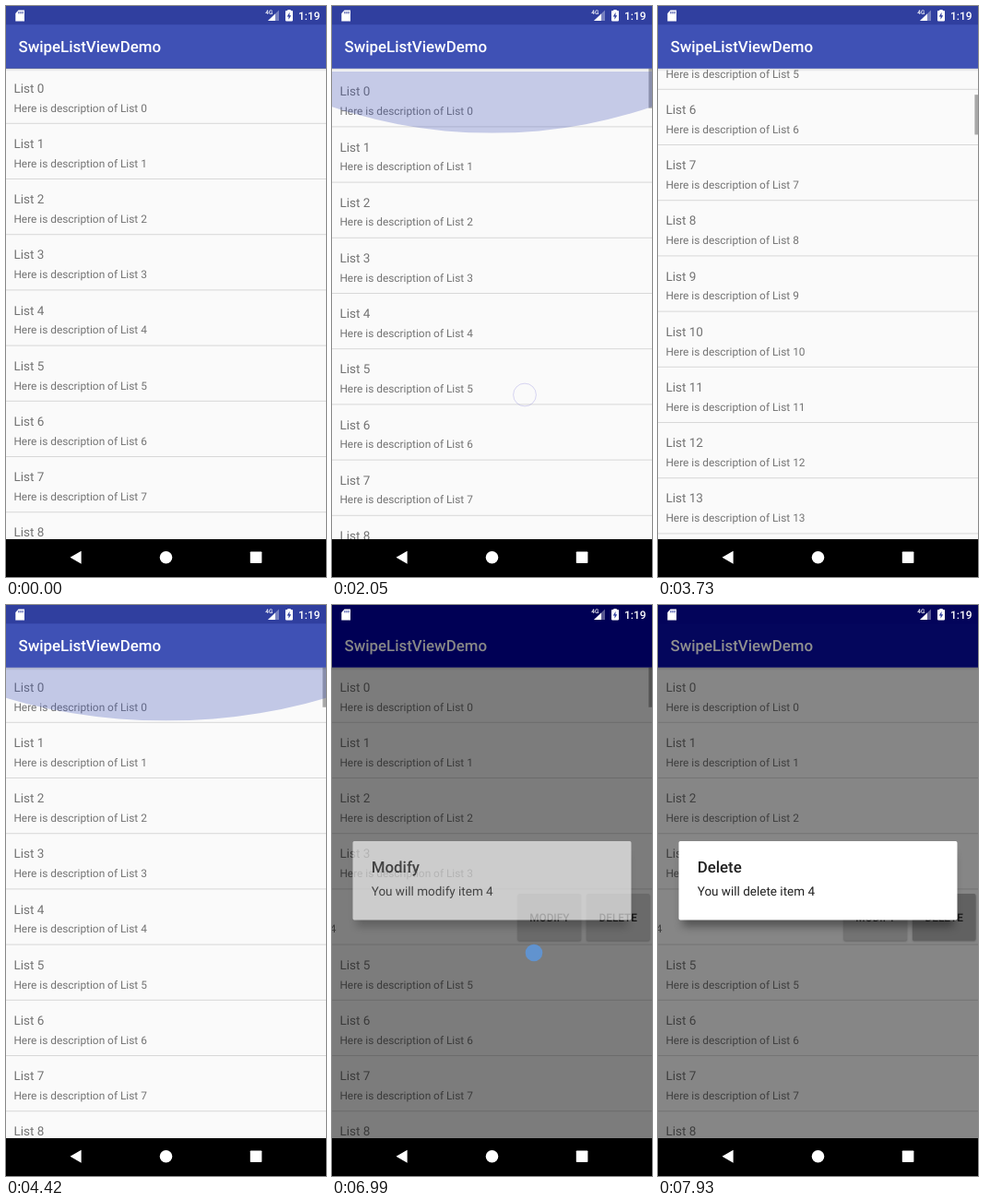
Recreate the animation shown at these times as an HTML page with a canvas. Size 347 px wide and 619 px high, loop 8 s.

```html
<!DOCTYPE html>
<html lang="en">
<head>
<meta charset="utf-8">
<title>Swipe list</title>
<style>
  html, body { margin: 0; width: 100%; height: 100%; overflow: hidden; background: #000; }
  canvas { display: block; width: 347px; height: 619px; }
</style>
</head>
<body>
<canvas id="stage"></canvas>
<script>
const W = 347, H = 619, LOOP = 8000;
const LIST_TOP = 67.5, LIST_END = 578, LIST_H = LIST_END - LIST_TOP;
const ROW = 60.2, ROWS = 100, PAD = 8.4;
const MENU = 148.5, SWIPED = 4;
const DIM = 0.5;

const dpr = window.devicePixelRatio || 1;

function setup(canvas) {
  canvas.width = Math.round(W * dpr);
  canvas.height = Math.round(H * dpr);
  const c = canvas.getContext('2d');
  c.scale(dpr, dpr);
  c.textRendering = 'geometricPrecision';
  return c;
}

const stage = setup(document.getElementById('stage'));
const layer = setup(document.createElement('canvas'));
let ctx = stage;

const prog = (t, a, b) => Math.min(1, Math.max(0, (t - a) / (b - a)));
const smooth = u => u * u * (3 - 2 * u);
const easeOut = u => 1 - (1 - u) * (1 - u);
const mix = (a, b, u) => a + (b - a) * u;
const mixRgb = (a, b, u) => `rgb(${a.map((v, i) => Math.round(mix(v, b[i], u)))})`;
const move = (t, a, b, from, to) => mix(from, to, smooth(prog(t, a, b)));

// down, end of easing, release, x0, y0, x1, y1
const touches = [
  [550, 1050, 930, 214, 335, 206, 20],
  [1360, 2010, 2010, 203, 118, 209, 421.5],
  [3310, 3720, 3630, 212, 425, 206, 75],
  [3790, 4200, 4200, 205, 110, 210, 440],
  [5280, 5700, 5620, 268, 341, 120, 338],
  [6010, 6090, 6090, 236, 338, 236, 338],
  [6990, 7060, 7060, 219, 377, 219, 377],
  [7570, 7650, 7650, 310, 340, 310, 340]
];

const buttons = [
  { label: 'MODIFY', dx: 3, pressed: 6010, x: 236, y: 338 },
  { label: 'DELETE', dx: 77.5, pressed: 7570, x: 310, y: 340 }
];

function scrollAt(t) {
  if (t < 1360) return move(t, 550, 1050, 0, 293.6);
  if (t < 2050) return move(t, 1360, 2040, 293.6, -3.6);
  if (t < 3310) return move(t, 2050, 2140, -3.6, 0);
  if (t < 3780) return move(t, 3310, 3720, 0, 338);
  if (t < 4230) return move(t, 3780, 4230, 338, -3.6);
  return move(t, 4230, 4320, -3.6, 0);
}

function scrollbarAlpha(t) {
  if (t < 550) return 0;
  if (t < 3310) return 1 - prog(t, 2400, 2650);
  if (t < 5280) return 1 - prog(t, 4600, 4850);
  return 1 - prog(t, 7000, 7250);
}

function dialogAt(t) {
  if (t < 6990) {
    const u = easeOut(prog(t, 6230, 6460));
    return { name: 'Modify', alpha: u, scale: mix(0.92, 1, u), dim: DIM * u };
  }
  if (t < 7500) {
    return { name: 'Modify', alpha: 0.62 * (1 - prog(t, 6990, 7090)), scale: 1,
             dim: DIM * (1 - prog(t, 7000, 7250)) };
  }
  const u = easeOut(prog(t, 7740, 7920));
  return { name: 'Delete', alpha: u, scale: mix(0.92, 1, u), dim: 0.465 * u };
}

function text(str, x, y, size, color, weight = 400, align = 'left') {
  ctx.font = `${weight} ${size}px Roboto, sans-serif`;
  ctx.textAlign = align;
  ctx.fillStyle = color;
  ctx.fillText(str, x, y);
}

function rect(x, y, w, h, color) {
  ctx.fillStyle = color;
  ctx.fillRect(x, y, w, h);
}

function poly(points, color) {
  ctx.beginPath();
  points.forEach(([x, y]) => ctx.lineTo(x, y));
  ctx.closePath();
  ctx.fillStyle = color;
  ctx.fill();
}

function disc(x, y, r, color) {
  ctx.beginPath();
  ctx.arc(x, y, r, 0, Math.PI * 2);
  ctx.fillStyle = color;
  ctx.fill();
}

function roundRect(x, y, w, h, r, color) {
  ctx.beginPath();
  ctx.roundRect(x, y, w, h, r);
  ctx.fillStyle = color;
  ctx.fill();
}

function shadow(color, blur, dy) {
  ctx.shadowColor = color;
  ctx.shadowBlur = blur * dpr;
  ctx.shadowOffsetY = dy * dpr;
}

function drawButton(b, left, top, t) {
  const x = left + b.dx, y = top + 4.8, w = 68.5, h = 50.7;
  ctx.save();
  shadow('rgba(0,0,0,.3)', 2, 0.8);
  roundRect(x, y, w, h, 1.7, '#d6d6d6');
  ctx.restore();
  const fade = 1 - prog(t, b.pressed + 300, b.pressed + 700);
  if (t >= b.pressed && fade > 0) {
    ctx.save();
    ctx.clip();
    const r = mix(8, 60, easeOut(prog(t, b.pressed, b.pressed + 400)));
    disc(b.x, b.y, r, `rgba(0,0,0,${0.18 * fade})`);
    ctx.restore();
  }
  text(b.label, x + w / 2, top + 34.2, 11.8, '#212121', 500, 'center');
}

function drawRows(t) {
  const scroll = scrollAt(t);
  const swipe = move(t, 5280, 5740, 0, MENU);
  const first = Math.max(0, Math.floor(scroll / ROW));
  for (let i = first; i < first + 10; i++) {
    const top = LIST_TOP + i * ROW - scroll;
    const shift = i === SWIPED ? swipe : 0;
    text(`List ${i}`, PAD - shift, top + 26.3, 13.5, '#737373');
    text(`Here is description of List ${i}`, PAD - shift, top + 47, 11.87, '#737373');
    if (shift > 0) buttons.forEach(b => drawButton(b, W - shift, top, t));
    rect(0, top + 59.3, W, 1, '#d8d8d8');
  }
  const thumbY = LIST_TOP + Math.max(0, scroll) * LIST_H / (ROW * ROWS);
  rect(343.4, thumbY, 3.6, LIST_H * LIST_H / (ROW * ROWS), `rgba(0,0,0,${0.33 * scrollbarAlpha(t)})`);
}

// Edge glow: a wide circle peeking in from the top of the pulled list
function drawGlow(t, start, fade, end) {
  if (t < start || t > end) return;
  const rise = prog(t, start, start + 115);
  const left = (1 - prog(t, fade, end)) ** 2;
  const r = W * 1.5, depth = r * (1 - Math.cos(Math.PI / 6));
  ctx.save();
  ctx.translate(W / 2, LIST_TOP + Math.max(0, -scrollAt(t)));
  ctx.scale(1, Math.max(0.001, easeOut(rise) * left));
  ctx.beginPath();
  ctx.rect(-W / 2, 0, W, depth);
  ctx.clip();
  disc(0, depth - r, r, `rgba(63,81,181,${0.36 * rise * left})`);
  ctx.restore();
}

function drawList(t, dim) {
  ctx.save();
  ctx.beginPath();
  ctx.rect(0, LIST_TOP, W, LIST_H);
  ctx.clip();
  rect(0, LIST_TOP, W, LIST_H, '#fafafa');
  drawRows(t);
  drawGlow(t, 1960, 2190, 2910);
  drawGlow(t, 4150, 4360, 5060);
  const g = ctx.createLinearGradient(0, LIST_TOP, 0, LIST_TOP + 3.4);
  g.addColorStop(0, 'rgba(0,0,0,.15)');
  g.addColorStop(1, 'rgba(0,0,0,0)');
  rect(0, LIST_TOP, W, 3.4, g);
  if (dim > 0) rect(0, LIST_TOP, W, LIST_H, `rgba(0,0,0,${dim})`);
  ctx.restore();
}

function drawBars(dim) {
  const u = dim / DIM;
  rect(0, 0, W, LIST_TOP, mixRgb([63, 81, 181], [0, 0, 85], u));
  rect(0, 0, W, 20.2, mixRgb([48, 63, 159], [0, 0, 85], u));
  text('SwipeListViewDemo', 13.5, 50.4, 16.87, mixRgb([255, 255, 255], [135, 135, 135], u), 500);

  // Status icons
  poly([[13.5, 4.5], [20, 4.5], [20, 16.5], [10.3, 16.5], [10.3, 8]], '#fff');
  [13.4, 15.5, 17.6].forEach(x => rect(x, 6, 1, 2.4, '#303f9f'));
  text('4G', 281.3, 9.2, 6.4, '#fff', 500);
  poly([[284, 16], [296, 16], [296, 4.5]], 'rgba(255,255,255,.35)');
  poly([[284, 16], [292, 16], [292, 8.4]], '#fff');
  rect(305.3, 4, 3.4, 2, '#fff');
  roundRect(303, 5, 8, 11.4, 0.8, '#fff');
  poly([[307.6, 6.8], [304.8, 11.4], [306.6, 11.4], [306.4, 14.8], [309.2, 10.2], [307.4, 10.2]], '#303f9f');
  text('1:19', 317, 14.9, 12, '#fff', 500);

  // Navigation
  rect(0, LIST_END, W, H - LIST_END, '#000');
  poly([[69.5, 597.8], [81.6, 590.8], [81.6, 604.8]], '#fff');
  disc(173.5, 597.8, 6.8, '#fff');
  roundRect(264.8, 591.5, 12.6, 12.6, 0.8, '#fff');
}

function drawDialogBox(name, scale) {
  const x = 22.5, y = 256, w = 302, h = 85.5;
  ctx.clearRect(0, 0, W, H);
  ctx.save();
  ctx.translate(x + w / 2, y + h / 2);
  ctx.scale(scale, scale);
  ctx.translate(-x - w / 2, -y - h / 2);
  ctx.save();
  shadow('rgba(0,0,0,.38)', 10, 9);
  roundRect(x + 4, y + 4, w - 8, h - 6, 1.7, '#fff');
  ctx.restore();
  roundRect(x, y, w, h, 1.7, '#fff');
  text(name, 42.7, 289.6, 16.87, '#212121', 500);
  text(`You will ${name.toLowerCase()} item ${SWIPED}`, 42.7, 315.4, 13.5, '#212121');
  ctx.restore();
}

// The box fades as one group, so it is composed on its own layer
function drawDialog({ name, alpha, scale }) {
  if (alpha <= 0) return;
  ctx = layer;
  drawDialogBox(name, scale);
  ctx = stage;
  ctx.globalAlpha = alpha;
  ctx.drawImage(layer.canvas, 0, 0, W, H);
  ctx.globalAlpha = 1;
}

function drawTouch(t) {
  for (const [down, end, up, x0, y0, x1, y1] of touches) {
    if (t < down || t >= up + 80) continue;
    const at = Math.min(t, up);
    const x = move(at, down, end, x0, x1);
    const y = move(at, down, end, y0, y1);
    if (t < up) {
      disc(x, y, 9.3, 'rgba(88,155,235,.75)');
    } else {
      const u = (t - up) / 80;
      ctx.beginPath();
      ctx.arc(x, y, 9.3 + 6 * u, 0, Math.PI * 2);
      ctx.lineWidth = 1;
      ctx.strokeStyle = `rgba(100,90,210,${0.5 * (1 - u)})`;
      ctx.stroke();
    }
  }
}

function draw(t) {
  const dialog = dialogAt(t);
  drawList(t, dialog.dim);
  drawBars(dialog.dim);
  drawDialog(dialog);
  drawTouch(t);
}

const start = performance.now();
function tick() {
  draw((performance.now() - start) % LOOP);
  requestAnimationFrame(tick);
}
tick();
</script>
</body>
</html>
```
